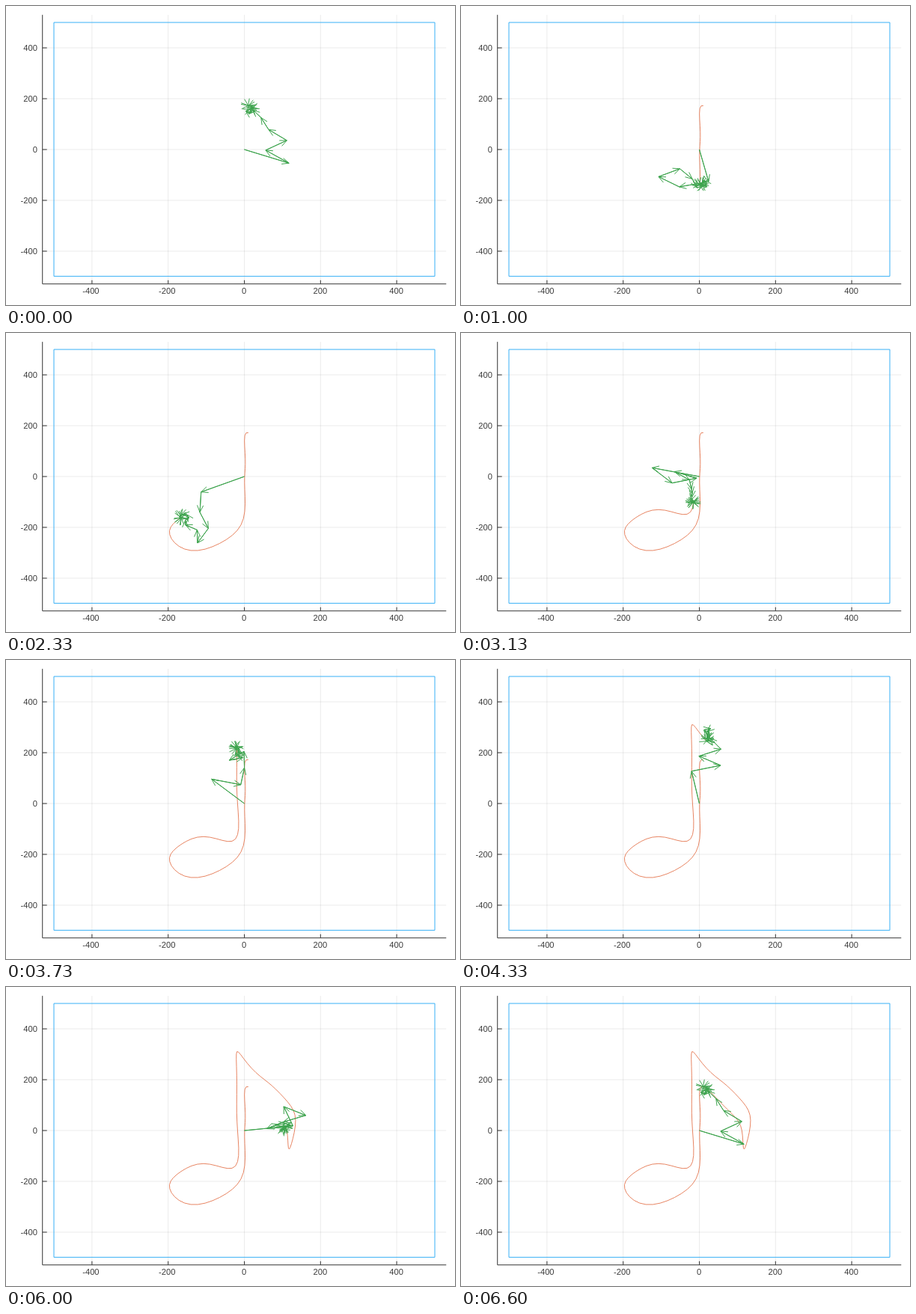
Animation, 600 px wide and 400 px high, one loop 6.67 s. Source, as an HTML page with a canvas:

```html
<!DOCTYPE html>
<html>
<head>
<meta charset="utf-8">
<style>
html, body { margin: 0; width: 100%; height: 100%; overflow: hidden; background: #fff; }
canvas { display: block; }
</style>
</head>
<body>
<canvas id="stage" width="600" height="400"></canvas>
<script>
const ctx = document.getElementById('stage').getContext('2d');
const FRAMES = 100, SPAN = FRAMES - 1, LOOP = 6670, STEP = 200 / 3;
const HARMONICS = 10, TAU = 2 * Math.PI;

// Eighth note as Bezier parts: duration in steps, two controls, end point
const noteStart = [3, 188];
const noteParts = [
  { steps: 15, curve: [[2, 100], [1, 0], [1, -130]] },                // stem, right side
  { steps: 15.5, curve: [[1, -302], [-197, -332], [-197, -223]] },    // head, lower half
  { steps: 15, curve: [[-197, -125], [-60, -120], [-16, -152]] },     // head, upper half
  { steps: 14, curve: [[-18, 9], [-20, 170], [-22, 331]] },           // stem, left side
  { steps: 24, curve: [[5, 196], [205, 130], [110, -90]] },           // flag, outer edge
  { steps: 15.5, curve: [[138, -10], [88, 75], noteStart] }           // flag, inner edge
];

const px = x => 318.5 + x * 0.509;
const py = y => 192 - y * 0.34;

function bezier(a, b, c, d, u) {
  const v = 1 - u;
  return a.map((_, i) =>
    v * v * v * a[i] + 3 * v * v * u * b[i] + 3 * v * u * u * c[i] + u * u * u * d[i]);
}

function notePoint(step) {
  let from = noteStart;
  for (const { steps, curve } of noteParts) {
    if (step < steps) return bezier(from, ...curve, step / steps);
    step -= steps;
    from = curve[2];
  }
  return from;
}

const samples = Array.from({ length: SPAN * 4 }, (_, i) => notePoint(i / 4));

// Fourier coefficient of the outline in polar form
function coefficient(freq) {
  let re = 0, im = 0;
  samples.forEach(([x, y], i) => {
    const a = -TAU * freq * i / samples.length;
    re += x * Math.cos(a) - y * Math.sin(a);
    im += x * Math.sin(a) + y * Math.cos(a);
  });
  return { freq, size: Math.hypot(re, im) / samples.length, phase: Math.atan2(im, re) };
}

const vectors = [];
for (let f = -HARMONICS; f <= HARMONICS; f++) vectors.push(coefficient(f));
vectors.sort((a, b) => b.size - a.size);

// Joints of the vector chain, in pixels
function chain(k) {
  let x = 0, y = 0;
  const joints = [[px(0), py(0)]];
  for (const v of vectors) {
    const a = v.phase + TAU * v.freq * k / SPAN;
    x += v.size * Math.cos(a);
    y += v.size * Math.sin(a);
    joints.push([px(x), py(y)]);
  }
  return joints;
}

const poses = Array.from({ length: FRAMES }, (_, k) => chain(k));
const trace = poses.map(joints => joints[joints.length - 1]);

function polyline(points, color, width = 1) {
  ctx.strokeStyle = color;
  ctx.lineWidth = width;
  ctx.beginPath();
  for (const [x, y] of points) ctx.lineTo(x, y);
  ctx.stroke();
}

function arrow([x0, y0], [x1, y1], color) {
  const a = Math.atan2(y1 - y0, x1 - x0);
  const barb = s => [x1 - 10 * Math.cos(a + s), y1 - 10 * Math.sin(a + s)];
  polyline([[x0, y0], [x1, y1]], color);
  polyline([barb(0.42), [x1, y1], barb(-0.42)], color);
}

function axes() {
  const ink = '#333', grid = 'rgba(0,0,0,0.08)';
  const left = px(-530), right = px(530), top = py(530), bottom = py(-530) - 0.4;
  ctx.font = '11.2px "Liberation Sans", Arial, sans-serif';
  ctx.fillStyle = '#3c3c3c';
  for (let v = -400; v <= 400; v += 200) {
    const x = px(v), y = py(v);
    polyline([[x, top], [x, bottom]], grid);
    polyline([[left, y], [right, y]], grid);
    polyline([[x, bottom], [x, bottom - 5]], ink);
    polyline([[left, y], [left + 6, y]], ink);
    ctx.textAlign = 'center';
    ctx.fillText(v, x - (v < 0 ? 1.5 : 0.5), 385);
    ctx.textAlign = 'right';
    ctx.fillText(v, 42, y + 4);
  }
  polyline([[left, top], [left, bottom], [right, bottom]], ink);
  ctx.strokeStyle = '#39b0f6';
  ctx.strokeRect(px(-500), py(500), px(500) - px(-500), py(-500) - py(500) - 0.4);
}

function draw(k) {
  const green = '#3ea44e';
  ctx.fillStyle = '#fff';
  ctx.fillRect(0, 0, 600, 400);
  ctx.lineJoin = 'round';
  axes();
  polyline(trace.slice(0, k + 1), '#e36f47', 0.85);
  const joints = poses[k];
  polyline(joints, green);
  for (let i = 1; i < joints.length; i++) arrow(joints[i - 1], joints[i], green);
}

const start = performance.now();
function tick() {
  // Frame delays are rounded to 10 ms, hence the small lead
  const t = (performance.now() - start) % LOOP;
  draw(Math.min(SPAN, Math.floor((t + 4) / STEP)));
  requestAnimationFrame(tick);
}
tick();
</script>
</body>
</html>
```
